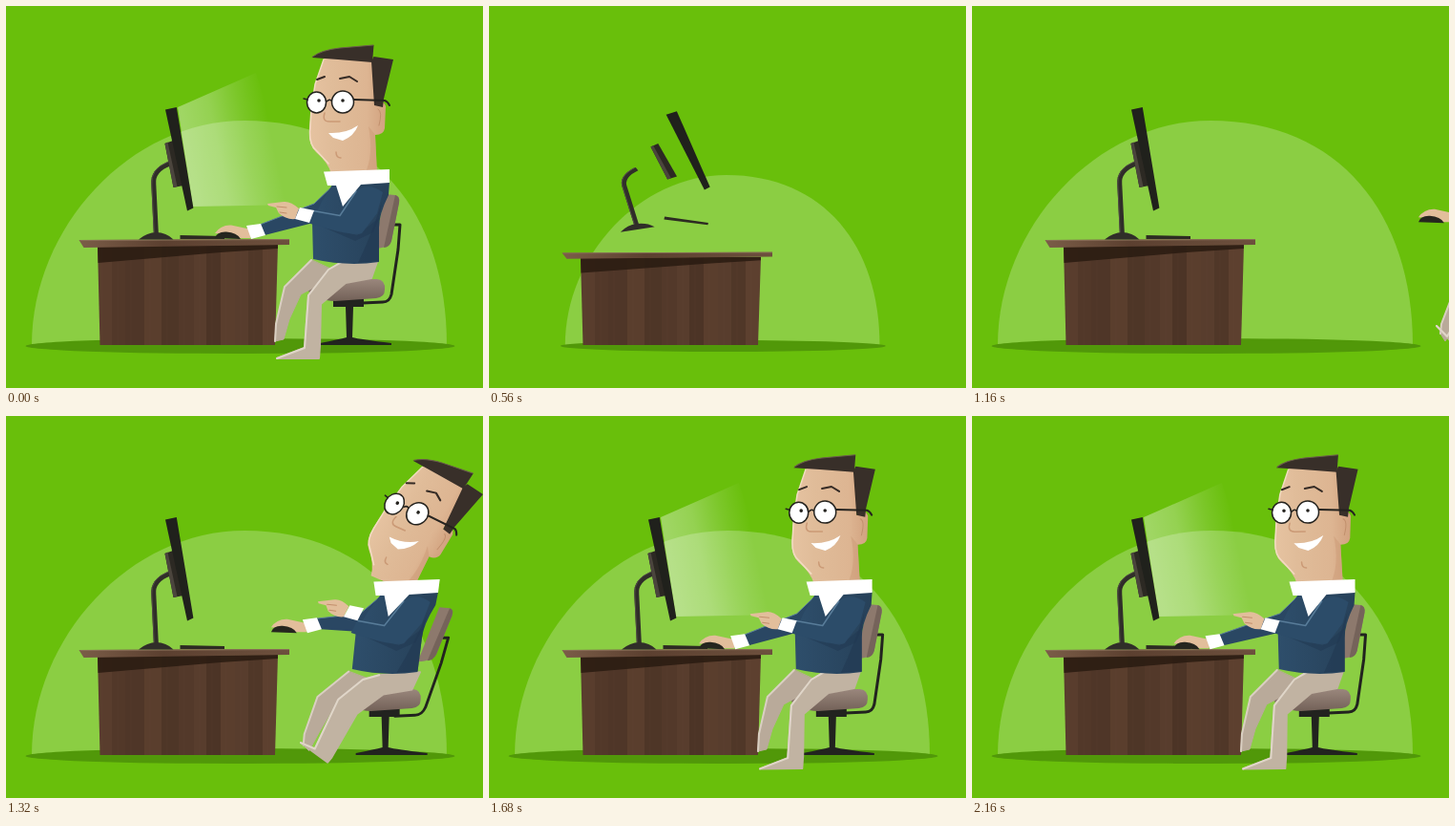
These frames come from a looping animation (500 px wide and 400 px high, 2.2 s). An HTML page:

```html
<!DOCTYPE html>
<html lang="en">
<head>
<meta charset="utf-8">
<title>Desk worker</title>
<style>
html, body { margin: 0; width: 100%; height: 100%; overflow: hidden; background: #69bf0b; }
svg { display: block; width: 500px; height: 400px; }
</style>
</head>
<body>
<svg viewBox="0 0 500 400">
  <defs>
    <linearGradient id="glow" gradientUnits="userSpaceOnUse" x1="180" y1="100" x2="268" y2="82">
      <stop offset="0" stop-color="#fff" stop-opacity=".37"/>
      <stop offset=".35" stop-color="#fff" stop-opacity=".29"/>
      <stop offset=".7" stop-color="#fff" stop-opacity=".12"/>
      <stop offset="1" stop-color="#fff" stop-opacity="0"/>
    </linearGradient>
    <linearGradient id="slab">
      <stop offset="0" stop-color="#7b5d48"/>
      <stop offset=".4" stop-color="#5c4030"/>
      <stop offset="1" stop-color="#6d503d"/>
    </linearGradient>
    <linearGradient id="seat" x2="0" y2="1">
      <stop offset="0" stop-color="#9a877c"/>
      <stop offset="1" stop-color="#736158"/>
    </linearGradient>
    <linearGradient id="skin">
      <stop offset="0" stop-color="#e6c3a1"/>
      <stop offset=".3" stop-color="#e0bc99"/>
      <stop offset=".75" stop-color="#ddb592"/>
      <stop offset="1" stop-color="#d2a27f"/>
    </linearGradient>
    <linearGradient id="knit">
      <stop offset="0" stop-color="#2e4e6b"/>
      <stop offset="1" stop-color="#274159"/>
    </linearGradient>
    <clipPath id="bodyClip"><path d="M96 251L285 250L282 355L98.500 355Z"/></clipPath>
  </defs>

  <rect width="500" height="400" fill="#69bf0b"/>
  <path id="dome" fill="#8bce43" d="M27 355C27 232 130 120 250 120C385 120 462 218 462 355Z"/>
  <ellipse id="shadow" cx="245.500" cy="356" rx="225" ry="8" fill="#519809"/>

  <g id="cabinet">
    <g id="planks" clip-path="url(#bodyClip)"></g>
    <path fill="#2b1c12" opacity=".88" d="M96 251L285 250V254L225 258L96.500 269Z"/>
  </g>
  <path id="beam" fill="url(#glow)" d="M180 106L262 70L304 208L196 210Z"/>
  <g id="above">
    <path fill="url(#slab)" d="M76.500 245L297 244L297 250L81.500 253Z"/>
    <path fill="none" stroke="#8a6e58" d="M77.500 245.500L297 244.500"/>
    <path id="keys" fill="#2d2b22" d="M182.500 240L229 241V244L182.500 244Z"/>
    <g id="stand">
      <path fill="none" stroke="#302e29" stroke-width="5" d="M157.500 241L154.800 187Q153 172 172 165"/>
      <path fill="none" stroke="#524e46" d="M155.300 239L152.800 187Q151 171 170 163"/>
      <path fill="#302e29" d="M139 244.500Q148 237 157.500 237Q168 237 175.500 244.500Z"/>
    </g>
    <g id="panel">
      <path fill="#2c2923" d="M166.500 144L175 141L186 188L175.500 190Z"/>
      <path fill="#4b453d" d="M166.500 144L169.500 142.500L179.500 189L175.500 190Z"/>
    </g>
    <path id="screen" fill="#20211c" d="M167 108.500L178.800 106L196.400 211.500L190 214.500Z"/>
  </g>

  <g id="man" stroke-linejoin="round" stroke-linecap="round">
    <g id="back">
      <path fill="none" stroke="#22231f" stroke-width="3" d="M407 229L413 229L411 255L404 302Q402 310 395 310L374 311"/>
      <path fill="#8d796d" d="M397 197L408 198Q413 199 412 206L404 246Q402 253 386 254Z"/>
      <path fill="#75635a" d="M408 198Q413 199 412 206L404 246Q402 253 396 253Z"/>
    </g>
    <g id="chair">
      <path fill="#22231f" d="M343 306H375V315H364L363 347Q371 349 404 353V355H329V353Q349 349 357 347L356 315H343Z"/>
      <path fill="url(#seat)" d="M320 286H389Q398 287 397 297Q397 305 388 306L345 309Q325 308 318 300Q312 289 320 286Z"/>
    </g>
    <polygon id="farLeg" fill="#b9aa9a" stroke="#b9aa9a"/>
    <polyline id="farEdge" fill="none" stroke="#dacfc2" stroke-width="2"/>
    <polygon id="nearLeg" fill="#c1b3a2" stroke="#c1b3a2" stroke-width="2"/>
    <polyline id="nearEdge" fill="none" stroke="#e0d6c9" stroke-width="2"/>
    <polygon id="farSleeve" fill="#2a4763"/>
    <polyline id="sleeveEdge" fill="none" stroke="#587c99"/>
    <g id="mouseHand">
      <path fill="#e2be9b" d="M219 238Q225 229 236 229.500L257 234L256 243L242 243L232 239Z"/>
      <path fill="#26261f" d="M219 243Q221 236 231 236.500Q242 237 246 244Z"/>
      <path fill="#fff" d="M252 230L267 228L272 240L257 244Z"/>
    </g>
    <g id="body">
      <path fill="url(#knit)" d="M344 184L402 184L401 198Q391 218 391 232L391 268Q357 273 322 265L321 226L331 205Z"/>
      <path fill="#223a52" d="M394 205Q391 218 391 232L391 267L369 269Q383 240 394 205Z" opacity=".6"/>
      <path fill="#223a52" d="M322 227L368 240L391 222L385 237L366 246Z" opacity=".55"/>
      <path fill="#2c4c69" d="M321 214L349 219L366 194Q380 184 395 195L389 217L373 238Q364 242 316 227Z"/>
      <path fill="none" stroke="#587c99" stroke-width="1.500" d="M322 214.500L350 219.500L367 194"/>
      <g id="pointing">
        <path fill="#e2be9b" d="M274 207L291 205Q298 204 307 212L303 223Q294 224 286 217L283 211L275 209Z"/>
        <path fill="none" stroke="#c38f6c" d="M284 210L294 211M287 216L294 217"/>
        <path fill="#fff" d="M308 211L323 214L318 227L303 223Z"/>
      </g>
      <g id="head">
        <path fill="url(#skin)" d="M334 54L386 56L386 104Q395 96 398 105L397 128Q396 135 387 135L389 176L341 176Q338 164 325 153Q317 146 318 130L320 108L324 82Z"/>
        <path fill="none" stroke="#f3dcc2" stroke-width="1.500" d="M333 56L324 82L320 108L318.500 132Q318 146 326 152L338 165"/>
        <path fill="#cc9a76" opacity=".5" d="M387 135L389 176L376 176Q386 156 380 126Z"/>
        <path fill="none" stroke="#c08f6c" d="M390 108Q395 110 391 125"/>
        <path fill="#382f29" d="M320.500 54Q330 46 350 44L385.500 41L384 59L348 56Z"/>
        <path fill="#382f29" d="M385.500 53L406 56L396 97L395 106L386 104L383 58Z"/>
        <path fill="none" stroke="#6b5a4d" d="M321.500 53Q331 46 350 44L385 41"/>
        <path fill="none" stroke="#352b25" stroke-width="2" d="M326 77L334 74M350 76L360 74L368 79"/>
        <path fill="none" stroke="#cb9a76" stroke-width="1.500" d="M334 112Q331 121 339 121L350 121M346 153Q346 159 351 159"/>
        <path fill="#fff" d="M338 133Q356 134 369 125Q365 136 353 141L343 138Z"/>
        <g stroke="#25231f" stroke-width="1.500">
          <ellipse class="lens" cx="325.500" cy="101" rx="10" ry="11"/>
          <circle class="lens" cx="353" cy="100.500" r="11.500"/>
          <path fill="none" d="M336 100Q339 97 341 99M312 97L316 98"/>
          <path fill="none" stroke-width="2" d="M365 98L397 99Q400 100 402 104"/>
        </g>
        <g id="pupils" fill="#25231f">
          <circle cx="328" cy="99" r="1.800"/><circle cx="353" cy="99" r="1.800"/>
        </g>
      </g>
      <path fill="#fff" d="M333 173.500L402 171L402 185L372 187L353 210L346 188L337 188Z"/>
    </g>
  </g>
</svg>
<script>
const LOOP = 2200, STEP = 40, FLOOR = 355, TOP = 245;
const $ = id => document.getElementById(id);
const lenses = document.querySelectorAll('.lens');
const move = (id, value) => $(id).setAttribute('transform', value);
const show = (id, on) => { $(id).style.display = on ? '' : 'none'; };
const points = (id, list) => $(id).setAttribute('points', list.map(p => p.join()).join(' '));
const clamp = v => Math.max(0, Math.min(1, v));
const easeOut = (t, start, length) => 1 - (1 - clamp((t - start) / length)) ** 2;
const smooth = p => p * p * (3 - 2 * p);
const linear = p => p;

// Interpolate a list of [time, value] pairs.
function track(t, list, ease = smooth) {
  if (t <= list[0][0]) return list[0][1];
  for (let i = 1; i < list.length; i++) {
    const [a, u] = list[i - 1], [b, v] = list[i];
    if (t <= b) return u + (v - u) * ease((t - a) / (b - a));
  }
  return list[list.length - 1][1];
}

// Wooden boards with slightly different browns.
const edges = [95, 111, 125, 145, 163, 181, 197, 210, 225, 240, 254, 269, 287];
let boards = '';
for (let i = 0; i < edges.length - 1; i++) {
  const x = edges[i], l = 24.5 + 2 * Math.sin(i * 2.3 + 1) + (i > 7 ? 1 : 0);
  boards += `<rect x="${x}" y="248" width="${edges[i + 1] - x + 1}" height="110" fill="hsl(22 33% ${l}%)"/>` +
    `<path d="M${x + 6} 251V355" stroke="#795a43" opacity=".13"/>`;
}
$('planks').innerHTML = boards;

// Leg outlines: rest point followed by its shift when leaning back.
const FAR_LEG = [[320, 266, 8, 1], [292, 294, 5, 0], [283, 333, 2, 0], [282, 351, 2, -4],
  [291, 349, 0, 1], [297, 328, 3, 2], [309, 302, 5, 2], [350, 280, 10, 0]];
const NEAR_LEG = [[390, 265, 11, 2], [352, 268, 8, 2], [338, 276, 6, 0], [317, 303, 3, -4],
  [313, 358, -10, -6], [284, 369, -1, -17], [328, 369, -11, -4], [329, 356, -9, 1],
  [330, 312, 7, 0], [356, 290, 8, 1], [383, 285, 10, 1]];
const bend = (leg, q) => leg.map(([x, y, dx, dy]) => [x + dx * q, y + dy * q]);

// Exploded offset: dx, dy, turn and pivot.
const PARTS = {
  screen: [27, -52, -9.5, 184, 160.5],
  panel: [7, -43, -11, 176, 166],
  stand: [-2, -31, -11, 158, 242],
  keys: [1, -40, 9, 206, 242]
};

function drawDesk(t, rest) {
  const s = rest ? 1 : easeOut(t, 240, 630);
  move('dome', `translate(245 ${FLOOR}) scale(${s}) translate(-245 ${-FLOOR})`);
  move('shadow', `translate(245 356) scale(${s}) translate(-245 -356)`);

  const k = rest ? 1 : easeOut(t, 300, 400);
  const g = rest ? 1 : easeOut(t, 320, 450);
  show('cabinet', k > 0);
  show('above', g > 0);
  move('cabinet', `translate(0 ${FLOOR}) scale(1 ${k}) translate(0 ${-FLOOR})`);
  move('above', `translate(0 ${FLOOR - (FLOOR - TOP) * k}) scale(1 ${g}) translate(0 ${-TOP})`);

  const e = rest ? 0 : track(t, [[800, 1], [880, 1.16], [1040, 0], [1080, .06], [1120, 0]]);
  for (const id in PARTS) {
    const [dx, dy, turn, x, y] = PARTS[id];
    move(id, `translate(${dx * e} ${dy * e}) rotate(${turn * e} ${x} ${y})`);
  }

  const b = rest ? 1 : track(t, [[1360, 0], [1520, .77], [1640, 1]], linear);
  show('beam', b > 0);
  move('beam', `translate(182 0) scale(${b} 1) translate(-182 0)`);
}

function drawMan(t, rest) {
  const here = rest || t >= 1120;
  show('man', here);
  if (!here) return;
  const slide = rest || t > 1640 ? 0 : 205 * .6 ** ((t - 1160) / 40);
  const q = rest ? 0 : track(t, [[1160, 2], [1520, 1], [1700, -.06], [1840, .02], [1960, .02], [2160, -.03]]);
  const reach = rest ? 0 : track(t, [[1160, 12], [1520, 0], [1840, 3], [1960, 3], [2100, -7]]);
  move('man', `translate(${slide} 0)`);

  const lean = y => q * (30.2 - .08 * y);
  move('body', `matrix(1 0 ${-.08 * q} 1 ${lean(0)} 0)`);
  move('back', `matrix(1 0 ${-.13 * q} 1 ${45 * q} ${2 * q})`);
  move('chair', `translate(${7 * q} 0)`);
  move('head', `rotate(${14.5 * q} 357 143)`);
  move('pointing', `translate(${2 * q} ${-8 * q})`);

  const far = bend(FAR_LEG, q), near = bend(NEAR_LEG, q);
  points('farLeg', far);
  points('farEdge', far.slice(0, 4));
  points('nearLeg', near);
  points('nearEdge', near.slice(1, 6));

  const hx = 16 * q + reach, hy = -12 * Math.min(q, 1.4);
  move('mouseHand', `translate(${hx} ${hy})`);
  const tilt = (x, y) => [x + lean(y), y];
  const sleeve = [tilt(345, 186), tilt(323, 207), [266 + hx, 229 + hy], [271 + hx, 240 + hy],
    tilt(326, 226), tilt(350, 220)];
  points('farSleeve', sleeve);
  points('sleeveEdge', sleeve.slice(0, 3));

  const blink = !rest && t >= 1440 && t < 1640;
  show('pupils', !blink);
  lenses.forEach(l => l.setAttribute('fill', blink ? '#e9cfb8' : '#fff'));
}

function frame(now) {
  const t = Math.floor(now % LOOP / STEP) * STEP;
  const rest = t < 280;
  drawDesk(t, rest);
  drawMan(t, rest);
}

let begin;
function tick(now) {
  begin ??= now;
  frame(now - begin);
  requestAnimationFrame(tick);
}
frame(0);
requestAnimationFrame(tick);
</script>
</body>
</html>
```
